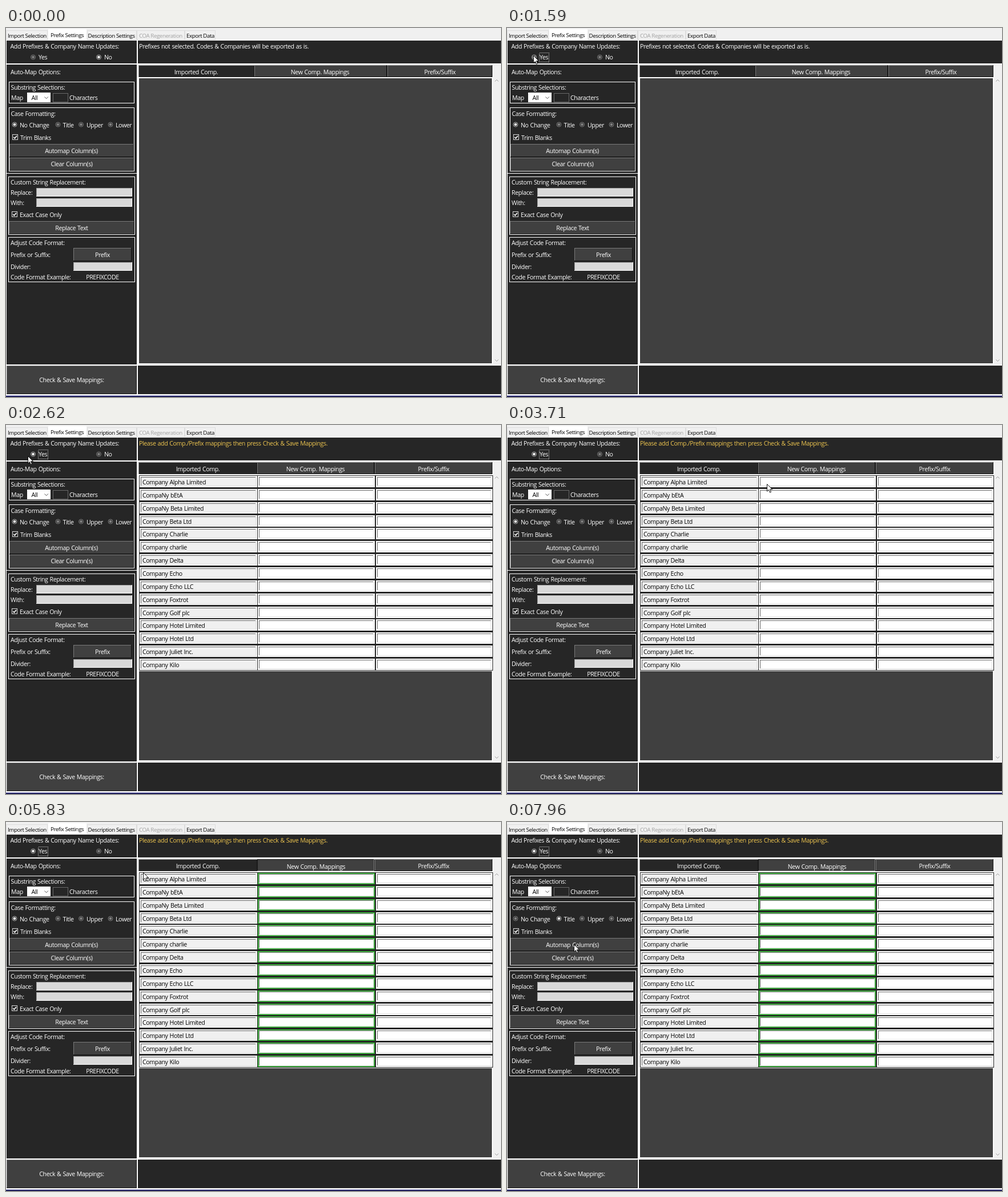
Write an HTML page that moves like this. It is 867 px wide and 646 px high and loops after 7.99 s.

```html
<!DOCTYPE html>
<html lang="en">
<head>
<meta charset="utf-8">
<title>Prefix Settings</title>
<style>
html, body { margin: 0; width: 100%; height: 100%; overflow: hidden; background: #f0f0f0; }
svg { display: block; }
text { font: 10.6px "Open Sans", "Noto Sans", sans-serif; letter-spacing: -.38px; word-spacing: .6px; fill: #fff; white-space: pre; }
text.tab { font-size: 9.7px; letter-spacing: -.4px; word-spacing: 0; }
rect, path.edge { shape-rendering: crispEdges; }
</style>
</head>
<body>
<svg id="stage" width="867" height="646" viewBox="0 0 867 646"></svg>
<script>
const LOOP = 7990;
const DARK = '#262626', GREY = '#404040', FACE = '#f0f0f0', GOLD = '#efc64f';
const stage = document.getElementById('stage');
let parent = stage;

function add(tag, attrs, text) {
  const el = document.createElementNS('http://www.w3.org/2000/svg', tag);
  for (const k in attrs) el.setAttribute(k, attrs[k]);
  if (text) el.textContent = text;
  return parent.appendChild(el);
}
function group(draw) {
  const outer = parent;
  const g = parent = add('g', {});
  draw();
  parent = outer;
  return g;
}
// Edges are given as left, top, right, bottom
const box = (l, t, r, b, fill) => add('rect', { x: l, y: t, width: r - l, height: b - t, fill });
const frame = (l, t, r, b, stroke = '#fff', width = 1) => add('rect', {
  x: l + width / 2, y: t + width / 2, width: r - l - width, height: b - t - width,
  fill: 'none', stroke, 'stroke-width': width });
const label = (s, x, mid, fill = '#fff') => add('text', { x, y: mid + 4, style: 'fill:' + fill }, s);
const centred = (s, x, mid) => add('text', { x, y: mid + 4, 'text-anchor': 'middle' }, s);
const edge = (d, stroke) => add('path', { d, stroke, fill: 'none', class: 'edge' });

function bevel(l, t, r, b, topLeft, bottomRight) {
  edge(`M${l + .5} ${b}V${t + .5}H${r}`, topLeft);
  edge(`M${l} ${b - .5}H${r - .5}V${t}`, bottomRight);
}
function button(s, l, t, r, b, x, mid, down) {
  box(l, t, r, b, GREY);
  if (down) bevel(l, t, r, b, '#1c1c1c', '#808080');
  else bevel(l, t, r, b, '#7a7a7a', '#161616');
  centred(s, x + (down ? 1 : 0), mid + (down ? 1 : 0));
}
function field(l, t, r, b, fill) {
  box(l, t, r, b, fill);
  bevel(l, t, r, b, '#a0a0a0', '#fff');
}
function radio(x, y) {
  const ring = add('circle', { cx: x, cy: y, r: 4, fill: '#303030', 'stroke-width': 1 });
  const dot = add('circle', { cx: x, cy: y, r: 2.3 });
  return on => {
    ring.setAttribute('stroke', on ? '#a8a8a8' : '#777');
    dot.setAttribute('fill', on ? '#fff' : '#808080');
  };
}
function check(x, y) {
  frame(x, y, x + 10, y + 10, '#d8d8d8');
  add('path', { d: `M${x + 2.3} ${y + 5}l2 2.3 3.6-4.6`, fill: 'none', stroke: '#fff', 'stroke-width': 1.6 });
}

// Tabs
box(0, 0, 867, 646, FACE);
box(0, 21, 867, 646, '#fff');
[['Import Selection', 0, 73, 3], ['Description Settings', 142, 229, 143.5],
 ['COA Regeneration', 229, 313, 233], ['Export Data', 313, 367, 316]].forEach(([s, l, r, x], i) => {
  frame(l, 4, r, 21, '#dcdcdc');
  box(l + 1, 5, r - 1, 20, FACE);
  label(s, x, 13, i === 2 ? '#a0a0a0' : '#000').setAttribute('class', 'tab');
});
box(74, 2, 141, 22, '#fff');
label('Prefix Settings', 78, 12, '#000').setAttribute('class', 'tab');

// Panels
box(1, 22, 229, 62, DARK);
box(231, 22, 867, 62, DARK);
box(1, 64, 229, 589, DARK);
button('Check & Save Mappings:', 1, 591, 229, 641, 115, 616);
box(231, 591, 867, 641, DARK);
box(0, 643, 867, 644, '#b4b4e0');
box(0, 644, 867, 646, '#20205c');

label('Add Prefixes & Company Name Updates:', 7.5, 31.5);
const yes = radio(47.5, 51), no = radio(162.5, 51);
label('Yes', 57, 51);
label('No', 172, 51);
const focus = frame(56, 43, 74, 60, '#ccc');
focus.setAttribute('stroke-dasharray', '1 1');

// Auto-map
label('Auto-Map Options:', 8, 77);
frame(5, 94, 225, 132);
label('Substring Selections:', 8.5, 104);
label('Map', 9, 122);
box(37, 113, 78, 130, '#fff');
label('All', 44.5, 122, '#000');
add('path', { d: 'M67.5 120.5l3.2 3.2 3.2-3.2', fill: 'none', stroke: '#555' });
frame(82, 114, 109, 130, '#696969');
label('Characters', 111, 122);

frame(5, 139, 225, 251);
label('Case Formatting:', 8.5, 150);
const [noChange, title, upper, lower] = [15, 91, 131.5, 183].map(x => radio(x, 169));
['No Change', 'Title', 'Upper', 'Lower'].forEach((s, i) => label(s, [24, 99.5, 141, 192][i], 169.5));
check(11, 186);
label('Trim Blanks', 25, 191.5);
button('Automap Column(s)', 6, 203, 224, 226, 114.5, 214.5);
button('Clear Column(s)', 6, 227, 224, 250, 115, 238);
box(1, 254, 229, 255, '#fff');

// Replacement
frame(4, 260, 226, 362);
label('Custom String Replacement:', 8, 269.5);
label('Replace:', 8, 288);
field(53, 280, 221, 295, '#d9d9d9');
label('With:', 8, 306);
field(53, 298, 221, 313, '#d9d9d9');
check(10, 321);
label('Exact Case Only', 24, 326.5);
button('Replace Text', 5, 338, 225, 361, 115, 349.5);

// Code format
frame(4, 366, 226, 445);
label('Adjust Code Format:', 8, 376);
label('Prefix or Suffix:', 8, 396.5);
button('Prefix', 118, 385, 220, 408, 169, 396.5);
label('Divider:', 8, 417.5);
field(118, 410, 221, 425, '#d9d9d9');
label('Code Format Example:', 8, 436);
centred('PREFIXCODE', 169, 436);

// Table area and scrollbar
box(233, 88, 851, 587, GREY);
box(853, 64, 867, 589, FACE);
for (const [y, d] of [[93.5, -3], [580.5, 3]])
  add('path', { d: `M856.5 ${y}l3 ${d} 3 ${-d}`, fill: 'none', stroke: '#999' });

function headers(cuts, mids, down) {
  box(232, 65, 852, 86, '#181818');
  box(233, 66, cuts[0] - 1, 86, DARK);
  edge('M232.5 86V65.5H852', '#8a8a8a');
  centred('Imported Comp.', mids[0], 76.5);
  button('New Comp. Mappings', cuts[0], 65, cuts[1] - 1, 86, mids[1], 76.5, down);
  button('Prefix/Suffix', cuts[1], 65, 852, 86, mids[2], 76.5);
}
const wide = group(() => headers([435, 668], [333, 550, 760]));
const even = group(() => headers([440, 646], [336, 542, 749]));
const pressed = group(() => headers([440, 646], [336, 542, 749], true));

const backing = group(() => {
  box(233, 88, 853, 430, DARK);
  box(233, 430, 853, 431, '#fff');
});

const names = ['Alpha Limited', 'bEtA', 'Beta Limited', 'Beta Ltd', 'Charlie', 'charlie', 'Delta', 'Echo',
  'Echo LLC', 'Foxtrot', 'Golf plc', 'Hotel Limited', 'Hotel Ltd', 'Juliet Inc.', 'Kilo'];
const ROW = 20;
const rowTop = i => Math.round(89 + i * 22.86);
function entry(l, r, t, fill) {
  box(l, t, r, t + ROW, fill);
  frame(l, t, r, t + ROW, '#fff');
  bevel(l + 2, t + 2, r - 2, t + ROW - 2, '#696969', '#e3e3e3');
}
const rows = group(() => names.forEach((s, i) => {
  const t = rowTop(i);
  entry(234, 440, t, FACE);
  entry(441, 646, t, '#fff');
  entry(648, 852, t, '#fff');
  label((i === 1 || i === 2 ? 'CompaNy ' : 'Company ') + s, 239, t + 10.5, '#000');
}));
const marks = group(() => names.forEach((s, i) => {
  frame(441, rowTop(i), 646, rowTop(i) + ROW, '#28a428', 1.7).style.shapeRendering = 'auto';
}));

// Status line
const ask = 'Please add Comp./Prefix mappings then press Check & Save Mappings.';
const idleText = label('Prefixes not selected. Codes & Companies will be exported as is.', 233, 31.5);
const askText = label(ask, 233, 31.5, GOLD);
const cutText = group(() => {
  parent = add('svg', { x: 231, y: 23, width: 303, height: 38, overflow: 'hidden' });
  centred(ask, 151.5, 8.5).style.fill = GOLD;
});

const pointer = add('path', {
  d: 'M.5 .5V13.2L3.4 10.5 5.4 15.2 7.5 14.3 5.5 9.7H9.6Z',
  fill: '#fff', stroke: '#000', 'stroke-width': .9 });

// Pointer path: time, x, y
const keys = [[30, 832, 660], [70, 809, 639], [440, 370, 300], [840, 88, 77], [890, 83, 72], [1210, 46, 48],
  [2210, 46, 48], [2620, 38, 54], [3020, 164, 108], [3420, 345, 116], [3820, 479, 96], [4060, 500, 81],
  [4329, 500, 81], [4330, 501, 82], [5340, 501, 82], [5560, 425, 73], [6150, 78, 114], [6710, 72, 132],
  [6980, 87, 174], [7220, 91, 164], [7420, 91, 164], [7800, 109, 194], [7960, 117, 214], [7990, 117, 214]];

const slope = (i, c) => (keys[i + 1][c] - keys[i][c]) / (keys[i + 1][0] - keys[i][0]);
function tangent(i, c) {
  if (i === 0 || i === keys.length - 1) return 0;
  const a = slope(i - 1, c), b = slope(i, c);
  return a * b > 0 ? 2 * a * b / (a + b) : 0;
}
function along(t, c) {
  if (t <= keys[0][0]) return keys[0][c];
  let i = 0;
  while (i < keys.length - 2 && t >= keys[i + 1][0]) i++;
  const h = keys[i + 1][0] - keys[i][0], u = Math.min(1, (t - keys[i][0]) / h), v = 1 - u;
  return keys[i][c] * v * v * (1 + 2 * u) + keys[i + 1][c] * u * u * (3 - 2 * u)
    + h * u * v * (tangent(i, c) * v - tangent(i + 1, c) * u);
}

const show = (el, on) => { el.style.display = on ? '' : 'none'; };
function draw(t) {
  const chosen = t >= 1590, building = t >= 1670, filled = t >= 1710, down = t >= 4690, titled = t >= 7340;
  yes(chosen);
  no(!chosen);
  noChange(!titled);
  title(titled);
  upper(false);
  lower(false);
  show(focus, chosen);
  show(idleText, !building);
  show(cutText, building && !filled);
  show(askText, filled);
  show(wide, !filled);
  show(even, filled && !down);
  show(pressed, down);
  show(backing, building);
  show(rows, filled);
  show(marks, t >= 4820);
  pointer.setAttribute('transform', `translate(${Math.round(along(t, 1))} ${Math.round(along(t, 2))})`);
}

const start = performance.now();
function tick(now) {
  draw(Math.max(0, now - start) % LOOP);
  requestAnimationFrame(tick);
}
draw(0);
requestAnimationFrame(tick);
</script>
</body>
</html>
```
